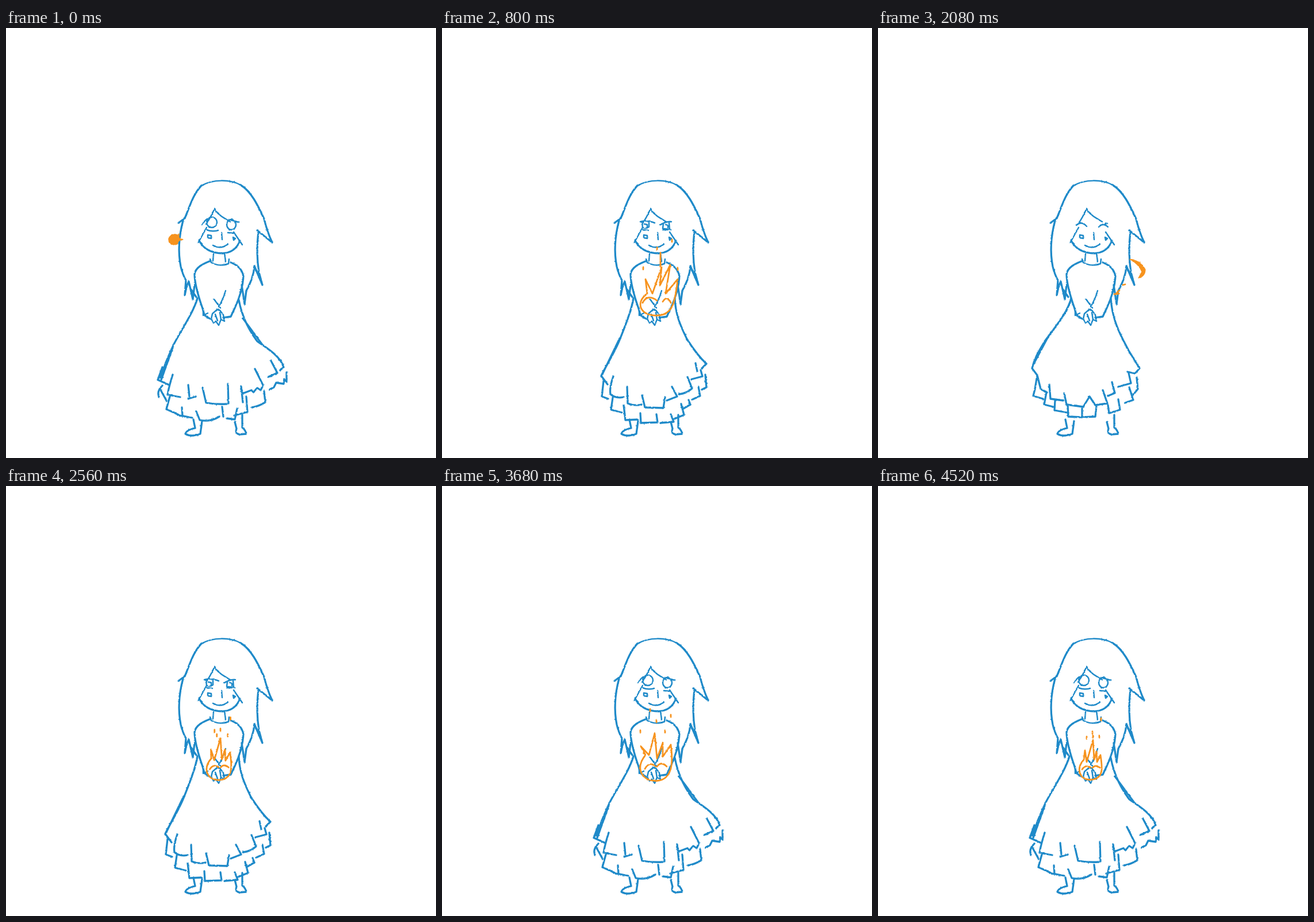
An HTML page that plays this animation: 748x748 px, repeating every 4.56 s.

```html
<!DOCTYPE html>
<html lang="en">
<head>
<meta charset="utf-8">
<title>Flame dance</title>
<style>
html, body { margin: 0; width: 100%; height: 100%; overflow: hidden; background: #fff; }
svg { display: block; width: 100vw; height: 100vh; }
path { stroke-linecap: round; stroke-linejoin: round; }
.ink path { fill: none; stroke: #1f8ac9; stroke-width: 3.3; }
.ink .thin { stroke-width: 2.5; }
.fire path { stroke: #f7931e; }
#glow { fill: #f7931e; stroke-width: 1.2; }
#sparks { fill: none; stroke-width: 2.8; }
</style>
</head>
<body>
<svg viewBox="0 0 748 748">
  <filter id="rough" filterUnits="userSpaceOnUse" x="0" y="0" width="748" height="748" color-interpolation-filters="sRGB">
    <feTurbulence type="fractalNoise" baseFrequency=".22" numOctaves="2" seed="4"/>
    <feDisplacementMap in="SourceGraphic" scale="2.4" xChannelSelector="R" yChannelSelector="G"/>
  </filter>
  <g class="ink" filter="url(#rough)">
    <!-- hair -->
    <path d="M300 339L311 331C320 310 325 290 340 274" />
    <path class="thin" d="M340 274C360 263 390 263 408 273"/>
    <path d="M408 273C428 285 440 313 449 332C452 345 457 360 463 373L437 352"/>
    <path d="M308 335C300 365 299 390 304 415Q307 428 313 439L311 465Q314 448 318 441L325 472L328 447M322 455L331 468"/>
    <path d="M439 354C436 380 436 400 440 425L446 447L432 414C431 430 426 442 418 457L415 480L410 447"/>
    <!-- face -->
    <path class="thin" d="M363 314C358 325 354 333 348 341M363 314C367 324 378 330 390 337M349 347L334 374"/>
    <path d="M336 369C342 385 360 392 377 392C392 391 402 383 407 370"/>
    <path class="thin" d="M396 355L411 377M375 356L376 368M360 378Q373 386 386 376M351 360l6 1v5l-6 -1zM395 364l4 2l-3 3z"/>
    <!-- neck, sleeves, hands -->
    <path class="thin" d="M361 393L360 405M380 391L382 406M355 402L357 408Q372 416 387 410L388 402"/>
    <path d="M356 405C343 410 330 416 328 428C328 445 335 468 342 488L345 499Q351 505 357 506M391 408C402 412 411 420 413 432C412 450 406 470 398 487L391 502L378 504"/>
    <path class="thin" d="M382 457Q379 469 370 485M362 472L373 487M343 488L343 500L351 496"/>
    <path class="thin" d="M357 506L359 497L367 490L372 491L378 499L380 510L374 507L370 517L365 510L361 513L357 506M364 498L368 509M372 495L374 507"/>
    <!-- feet -->
    <path d="M326 681L329 696Q314 699 312 706Q322 712 338 706L341 684M398 685L401 697Q398 705 406 707L418 706Q417 700 411 695L411 673"/>
    <path id="eyes" class="thin"/>
    <path id="dress"/>
  </g>
  <g class="fire" filter="url(#rough)">
    <path id="glow"/>
    <path id="sparks"/>
  </g>
</svg>
<script>
const LOOP = 4560, STEP = 40, SWING = 920, ORBIT = 1000;
const el = id => document.getElementById(id);

const eyes = {
  open: 'M349 338a9 9 0 1 0 18 0a9 9 0 1 0 -18 0M384 342a8 9 0 1 0 16 0a8 9 0 1 0 -16 0M341 343Q345 335 350 332M349 351Q358 355 369 352M386 356L397 357M388 333L405 338',
  stern: 'M345 337Q355 333 370 339M348 338L349 347Q354 350 360 346L360 338M352 341l5 1v4M347 351L359 352M379 343Q389 336 399 337M385 340L384 349L396 350L395 339M389 342l4 1v4M384 351L398 351',
  shut: 'M345 343Q354 335 363 345M384 346Q391 338 400 346M390 342L399 340'
};

const right = {
  eyes: eyes.open,
  dress: 'M333 470C326 495 305 525 292 550C282 572 274 590 268 608M290 556L270 612M272 590L264 612L284 621'
    + 'M290 603Q283 625 281 638L303 642M317 621L319 641M317 645L330 641M342 626L348 652Q365 655 384 654M386 619L387 653M409 623L412 651'
    + 'M411 636L427 630L430 634L437 626L443 630L446 624M433 593L447 621M461 579L472 600L456 607'
    + 'M405 473C410 500 422 525 437 545C455 557 478 572 483 590L477 595M412 505L446 551'
    + 'M488 599L488 615L484 611L483 619L470 617L466 625L458 629'
    + 'M272 622Q262 632 266 641M268 628L279 648M285 641L279 663L305 675M306 660L307 676M309 675L324 678'
    + 'M331 667L337 682Q355 686 371 676M376 659L378 676M384 679L398 681L402 662M418 641L420 668L397 674M449 632L451 651Q440 658 428 660'
};
const middle = {
  eyes: eyes.stern,
  dress: 'M333 470C330 490 318 520 308 545C297 570 284 590 277 605L288 620M309 540L280 600'
    + 'M405 470C406 500 416 520 426 541C438 560 450 575 460 584L452 592M441 583L444 597'
    + 'M281 614L278 641L289 645M298 606Q291 625 293 637Q302 645 316 642M322 624L323 653Q335 658 347 655'
    + 'M348 639L353 660L385 661L388 642M400 624L409 641L391 648M427 607L435 627Q425 636 412 637M450 595L453 606L434 611'
    + 'M458 603L460 625L452 629M446 624L449 640L436 646M429 647L432 655L420 662'
    + 'M297 643L294 664L313 669M316 656L319 682L341 681M345 670L346 687L375 686L373 672M398 672L403 685L380 687M416 654L421 673L404 680'
};
const centreLeft = {
  eyes: eyes.shut,
  dress: 'M336 470C330 495 308 520 290 545C278 565 272 575 268 592L277 604M296 537L272 582'
    + 'M405 470C407 510 425 540 436 561L455 592L447 601L434 598'
    + 'M277 604L273 628L270 640L287 645M277 604L283 628L294 634M298 620L300 645L322 648M324 636L328 655L357 659L368 641L378 656L399 653L391 630'
    + 'M407 616L412 635L400 640M436 600L440 618L418 624M450 608L452 628L444 638M437 625L444 647L430 652'
    + 'M293 634L289 655L305 659M308 648L307 665L329 669M330 655L331 676L354 677M355 660L355 677L378 676L380 658M400 656L402 670L421 664L418 646'
};
const left = {
  eyes: eyes.shut,
  dress: 'M334 470C320 510 295 535 270 555Q258 568 254 574L265 594M304 522L258 567M252 573L259 590'
    + 'M406 470C412 510 418 540 424 556M415 545L447 590L438 602L434 596'
    + 'M267 582L260 605L277 614M281 606L278 625Q288 633 298 630M304 617L305 637L326 643M327 630L331 655L352 656'
    + 'M353 641L358 659L385 655L387 638M406 628L410 641L391 648M421 617L425 630L410 636M445 606L432 615'
    + 'M258 602L251 618L266 630M269 628L270 648L284 650M285 641L286 657L307 661M309 650L313 668L335 672M335 660L335 672L359 673L360 664'
    + 'M383 660L382 674L360 674M408 651L409 668L383 674M427 641L426 657L412 661M437 621L441 638L428 645M446 612L447 630L438 636'
};
// Start time of each pose within one swing
const poses = [[0, right], [160, left], [320, centreLeft], [480, middle]];

// Fireball cels by step of the orbit: [filled shape, loose strokes]
const cels = {
  0: ['M283 366Q288 356 299 360L301 358L301 365L308 368L300 371Q298 378 291 377Q282 376 283 366Z', ''],
  1: ['M308 402Q350 430 395 444Q407 438 398 431Q350 425 308 402Z', 'M318 396l5 2'],
  2: ['M438 402Q456 404 465 420Q465 432 453 435L459 424Q454 411 438 402Z', 'M411 463l8 -1M415 461l5 -5M426 447l4 -1'],
  3: ['', 'M444 399l7 6M456 425l3 -3'],
  4: ['M250 322Q254 312 266 315L279 320L267 327Q256 334 250 322Z', ''],
  5: ['M440 300Q475 282 486 252Q498 244 500 256Q484 292 440 300Z', 'M424 312l6 -2'],
  6: ['M498 246Q520 226 524 196Q536 184 541 198Q532 230 498 246Z', 'M485 260l5 -5'],
  7: ['M516 268Q508 260 514 252L532 241L527 260Q524 270 516 268Z', 'M538 243l-2 4'],
  8: ['M478 322Q470 314 476 304L510 262L488 314Z', 'M521 254l-3 5'],
  9: ['M424 400L456 340L490 285L466 346L432 400Z', 'M500 278l-4 7M505 297l-2 4'],
  10: ['M366 496L388 440L430 380L461 324L450 352L432 384L408 424L384 470Z', 'M490 283L484 294M494 309l-2 3M451 316l-3 4'],
  22: ['M342 464Q340 446 356 449Q376 464 390 486Q362 482 342 464Z', 'M331 446h6M318 476l6 -1M364 432v5M396 440l4 -4'],
  23: ['M431 457Q450 450 458 432Q445 423 451 408Q460 402 468 409Q472 425 458 441Q445 455 431 457Z', 'M326 446h11M342 456h6M317 476l7 -1M363 472l4 -2M393 472l7 -1'],
  24: ['', 'M440 398l8 5M431 457l6 -2M397 468l5 -1']
};

// Each flame: outline, two inner bumps, five sparks
const flames = [
  [520, [360,460, 358,476, 344,492, 350,511, 370,511, 394,510, 390,488, 387,468, 381,480, 380,462, 376,476, 374,442, 363,480,
    355,493, 361,484, 369,490, 373,490, 379,484, 386,490, 363,436, 373,427, 388,404, 374,434, 385,434]],
  [680, [346,453, 354,468, 336,490, 346,513, 373,513, 402,511, 402,480, 398,450, 384,471, 384,447, 374,474, 370,430, 360,468,
    353,492, 361,478, 371,488, 374,488, 381,478, 391,488, 362,388, 373,407, 398,398, 345,425, 388,425]],
  [800, [354,437, 357,462, 335,478, 345,501, 374,500, 404,500, 406,470, 410,437, 389,462, 397,412, 379,448, 382,416, 366,462,
    349,478, 357,462, 374,474, 384,476, 392,464, 398,478, 400,368, 374,382, 380,391, 350,416, 410,417]]
];
const outline = 'MLC  C  LLLLL';

function flame(time) {
  const [a, b] = time < 680 ? flames : flames.slice(1);
  const k = Math.min(1, (time - a[0]) / (b[0] - a[0]));
  const v = a[1].map((n, i) => n + (b[1][i] - n) * k);
  const p = i => v[2 * i] + ' ' + v[2 * i + 1] + ' ';
  let d = [...outline].map((c, i) => c + p(i)).join('') + 'Z';
  for (const i of [13, 16]) d += 'M' + p(i) + 'Q' + p(i + 1) + p(i + 2);
  for (let i = 19; i < 24; i++) d += 'M' + p(i) + 'v4';
  return time >= 760 ? d + 'M380 391V415' : d;
}

function draw(now) {
  const t = Math.floor(now % LOOP / STEP) * STEP;
  const swing = (t + 80) % SWING;
  const pose = poses.filter(p => p[0] <= swing).pop()[1];
  el('eyes').setAttribute('d', pose.eyes);
  el('dress').setAttribute('d', pose.dress);
  const time = t % ORBIT;
  const [shape, strokes] = cels[time / STEP] || ['', flame(time)];
  el('glow').setAttribute('d', shape);
  el('sparks').setAttribute('d', strokes);
}

function tick() {
  draw(performance.now());
  requestAnimationFrame(tick);
}
tick();
</script>
</body>
</html>
```
